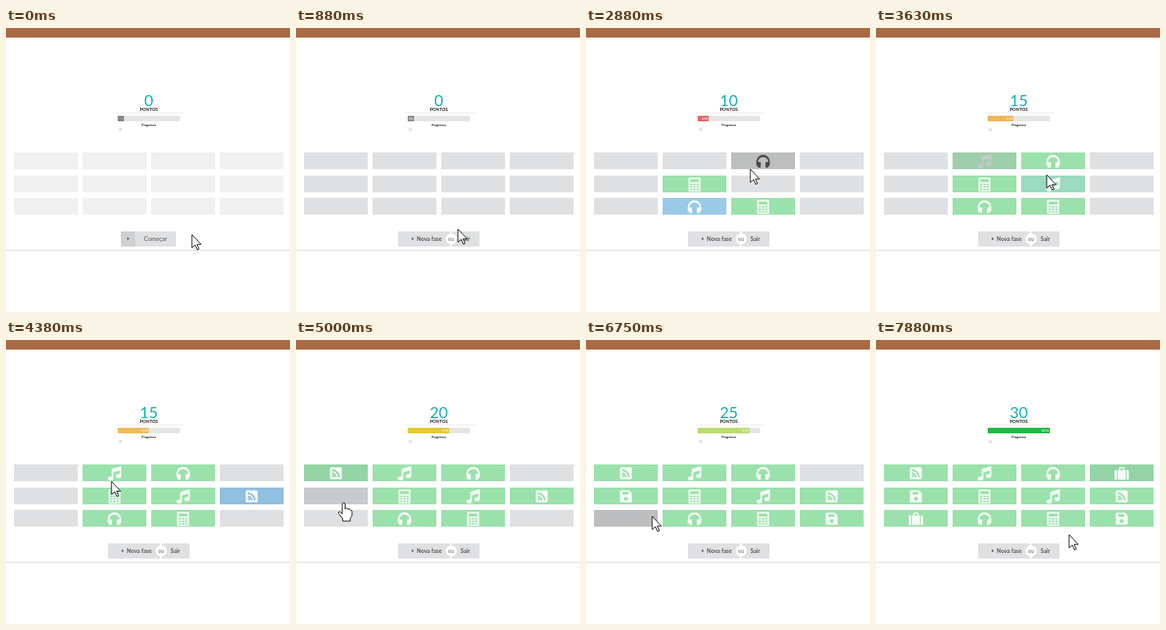
Recreate the animation shown at these times as an HTML page. Size 356 by 356 pixels, loop 8000 ms.

```html
<!DOCTYPE html>
<html lang="pt">
<head>
<meta charset="utf-8">
<title>Jogo da memória</title>
<style>
html, body { margin: 0; width: 100%; height: 100%; overflow: hidden; background: #fff; }
svg { display: block; width: 100vw; height: 100vh; }
text { font-family: Lato, sans-serif; font-weight: 700; text-anchor: middle; }
.button { font-size: 7.1px; fill: #555; }
</style>
</head>
<body>
<svg id="stage" viewBox="0 0 356 356">
  <rect width="356" height="12" fill="#aa6a45"/>
  <path d="M0 278.5H356" stroke="#d9d9da"/>
  <text id="score" x="179" y="97.5" font-size="19.5" style="font-weight:400" fill="#10b0b5">0</text>
  <text x="179" y="104" font-size="5.5" fill="#1b1c1d">PONTOS</text>
  <path d="M137 106.5H224" stroke="#ececec"/>
  <rect x="140" y="110" width="78" height="7" rx="1" fill="#e5e5e5"/>
  <rect id="bar" x="140" y="110" height="7" rx="1"/>
  <text id="percent" y="115" font-size="4" fill="#fff" fill-opacity=".8" style="text-anchor:end"></text>
  <text x="179" y="123" font-size="4.1" fill="#1b1c1d">Progresso</text>
  <circle cx="143.3" cy="127.3" r="1.5" fill="none" stroke="#bbb" stroke-width=".8"/>
  <g id="cards"></g>
  <g id="start">
    <rect id="startFace" x="144" y="255" width="69" height="19" rx="1"/>
    <rect x="144" y="255" width="18" height="19" rx="1" fill-opacity=".07"/>
    <path d="M152 262v4l2.5-2z" fill="#555"/>
    <text class="button" x="187.5" y="267" style="font-weight:400;font-size:7.4px">Começar</text>
  </g>
  <g id="playing">
    <path d="M128 255H193V274H128ZM195 255H230V274H195Z" fill="#dfe0e2"/>
    <circle cx="194.5" cy="264.5" r="7" fill="#fff"/>
    <path d="M145.3 262.3v4l2.5-2z" fill="#555"/>
    <text class="button" x="167" y="267">Nova fase</text>
    <text x="194.5" y="266.7" font-size="6.5" fill="#888">ou</text>
    <text class="button" x="212.3" y="267">Sair</text>
  </g>
  <g id="pointer" fill="#fff" stroke="#111" stroke-linejoin="round">
    <path id="arrow" d="M0 0V16.5L4 13L6.8 19L9 18L6.4 12.2H11.5Z"/>
    <path id="hand" d="M-2 14V2Q-2 0-.2 0T1.6 2V8Q2 6.5 3.6 6.8T5.2 8.5Q5.8 7.4 7 7.8T8.3 9.6Q9.8 9 10.2 11V15Q10 18 8 19.5V23H-1.5V20L-6.5 13.5Q-7 11-4.6 11.4Z"/>
  </g>
</svg>
<script>
const LOOP = 8000, STEP = 125, STARTED = 600;
const $ = id => document.getElementById(id);
const box = (x, y, w, h) => `M${x} ${y}h${w}v${h}h${-w}z`;
const disc = (x, y, r) => `M${x - r} ${y}a${r} ${r} 0 1 0 ${2 * r} 0a${r} ${r} 0 1 0 ${-2 * r} 0z`;

let keys = '';
for (const x of [-5.5, -1.4, 2.7]) for (const y of [-1, 2.3, 5.6]) keys += box(x, y, 2.8, 2);

const ICONS = {
  calc: 'M-6.5-8.5H6.5Q7.5-8.5 7.5-7.5V8Q7.5 9 6.5 9H-6.5Q-7.5 9-7.5 8V-7.5Q-7.5-8.5-6.5-8.5Z' + box(-5.5, -6.5, 11, 3.8) + keys,
  phones: 'M-8.5 5V.5A8.5 8.5 0 0 1 8.5 .5V5L6.5 6.5V8H3V1H6.3A6.3 6.3 0 0 0-6.3 1H-3V8H-6.5V6.5Z',
  music: 'M-3.5-5.5L8.5-9V3.5A3.5 2.5 0 1 1 6.5 1.3V-3.5L-1.5-1V6.5A3.5 2.5 0 1 1-3.5 4.3Z',
  rss: 'M-6-7.5H6Q7.5-7.5 7.5-6V6Q7.5 7.5 6 7.5H-6Q-7.5 7.5-7.5 6V-6Q-7.5-7.5-6-7.5Z'
    + 'M-5-5A10 10 0 0 1 5 5H2.8A7.8 7.8 0 0 0-5-2.8ZM-5-1A6 6 0 0 1 1 5H-1.2A3.8 3.8 0 0 0-5 1.2Z' + disc(-3.5, 3.5, 1.5),
  save: 'M-7.5-7.5H4L7.5-4V7.5H-7.5Z' + box(-4, -5.8, 7, 3.6) + disc(0, 3, 2.5),
  bag: 'M-5-4H-3.5V-6.5L-2.5-7.5H2.5L3.5-6.5V-4H5V8H-5ZM-2-4V-6H2V-4Z'
    + 'M-6-4V8H-7.5Q-9 8-9 6.5V-2.5Q-9-4-7.5-4ZM6-4V8H7.5Q9 8 9 6.5V-2.5Q9-4 7.5-4Z'
};

// Cards in the order they are opened: icon, row, column, click time. Every two make a pair.
const CLICKS = [
  ['calc', 2, 2, 1375], ['calc', 1, 1, 2125], ['phones', 2, 1, 2500], ['phones', 0, 2, 2780],
  ['music', 1, 2, 3125], ['music', 0, 1, 3425], ['rss', 1, 3, 3950], ['rss', 0, 0, 4550],
  ['save', 1, 0, 5080], ['save', 2, 3, 5850], ['bag', 2, 0, 6700], ['bag', 0, 3, 7375]
];

// Pointer stops: time, x, y
const PATH = [
  [0, 233, 259], [375, 203, 266], [625, 203, 266], [875, 203, 252], [1000, 203, 252],
  [1375, 212, 226], [1500, 212, 226], [1875, 177, 202], [2125, 146, 199], [2250, 146, 199],
  [2500, 140, 226], [2600, 142, 225], [2780, 207, 175], [2875, 206, 177], [3125, 212, 194],
  [3200, 212, 193], [3425, 160, 172], [3480, 160, 172], [3625, 214, 184], [3950, 296, 196],
  [4050, 294, 196], [4500, 70, 170], [4625, 70, 170], [5000, 60, 204], [5200, 58, 202],
  [5850, 290, 226], [5950, 288, 226], [6550, 98, 222], [6750, 83, 221], [6850, 82, 221],
  [7350, 290, 170], [7450, 290, 170], [7875, 242, 244], [8000, 242, 244]
];
const BAR_COLORS = ['#888888', '#e0646c', '#efb060', '#efb95c', '#e4c832', '#b9dc6b', '#21ba45'];

const ramp = (t, from, length) => Math.min(1, Math.max(0, (t - from) / length));
const lerp = (a, b, k) => a + (b - a) * k;
const rgb = hex => [1, 3, 5].map(i => parseInt(hex.substr(i, 2), 16));
function mix(a, b, k) {
  const end = rgb(b);
  return '#' + rgb(a).map((v, i) => Math.round(lerp(v, end[i], k)).toString(16).padStart(2, '0')).join('');
}

function add(tag, attrs) {
  const el = document.createElementNS('http://www.w3.org/2000/svg', tag);
  for (const name in attrs) el.setAttribute(name, attrs[name]);
  return $('cards').appendChild(el);
}
const cards = CLICKS.map(([icon, row, col, click], i) => {
  const x = 10 + 86 * col, y = [156, 185, 213][row];
  return {
    x, y, click,
    match: CLICKS[i | 1][3],
    blur: i < 11 ? CLICKS[i + 1][3] : Infinity,
    face: add('rect', { x, y, width: 80, height: 21 }),
    icon: add('path', { d: ICONS[icon], 'fill-rule': 'evenodd', transform: `translate(${x + 40} ${y + 11})` })
  };
});

function pointerAt(t) {
  const i = Math.max(1, PATH.findIndex(p => p[0] > t));
  const [t0, x0, y0] = PATH[i - 1], [t1, x1, y1] = PATH[i];
  const k = ramp(t, t0, t1 - t0);
  return [lerp(x0, x1, k), lerp(y0, y1, k)];
}

function drawCard(card, t, over) {
  const { click, match, face, icon } = card;
  const open = t >= click, focused = t < card.blur;
  let fill = mix('#f0f0f0', '#dfe0e2', ramp(t, STARTED, 250));
  if (over) fill = '#c8cacc';
  if (open) {
    const blue = focused ? '#90bfdf' : '#9bc8ea';
    const green = focused ? '#93d4a5' : '#9be1ab';
    const shown = mix(blue, green, ramp(t, match + 90, 150));
    fill = mix('#bdbebf', match === click ? green : shown, ramp(t, click + 90, 150));
  }
  face.setAttribute('fill', fill);
  icon.setAttribute('fill', mix('#444444', '#f6fcf8', ramp(t, click + 90, 150)));
  icon.setAttribute('visibility', t >= click + 70 ? 'visible' : 'hidden');
}

function draw(t) {
  const [x, y] = pointerAt(t), playing = t >= STARTED;
  const inside = (l, top, w, h) => x >= l && x < l + w && y >= top && y < top + h;
  const onButton = playing ? inside(128, 255, 102, 19) : inside(144, 255, 69, 19);
  let hand = onButton;

  for (const card of cards) {
    const over = playing && t < card.click && inside(card.x, card.y, 80, 21);
    hand = hand || over;
    drawCard(card, t, over);
  }

  let pairs = 0, level = 0;
  for (let i = 1; i < 12; i += 2) {
    pairs += t >= cards[i].click;
    level += ramp(t, cards[i].click + 80, 250);
  }
  const width = Math.max(8, 78 * level / 6), low = Math.min(5, Math.floor(level));
  $('score').textContent = pairs * 5;
  $('bar').setAttribute('width', width);
  $('bar').setAttribute('fill', mix(BAR_COLORS[low], BAR_COLORS[low + 1], level - low));
  $('percent').textContent = playing ? Math.round(level / 6 * 100) + '%' : '';
  $('percent').setAttribute('x', 139 + width);

  $('start').style.display = playing ? 'none' : '';
  $('playing').style.display = playing ? '' : 'none';
  $('startFace').setAttribute('fill', onButton ? '#cacbcd' : '#dfe0e2');
  $('pointer').setAttribute('transform', `translate(${x} ${y})`);
  $('arrow').style.display = hand ? 'none' : '';
  $('hand').style.display = hand ? '' : 'none';
}

function tick() {
  draw(Math.floor(performance.now() % LOOP / STEP) * STEP);
  requestAnimationFrame(tick);
}
tick();
</script>
</body>
</html>
```
